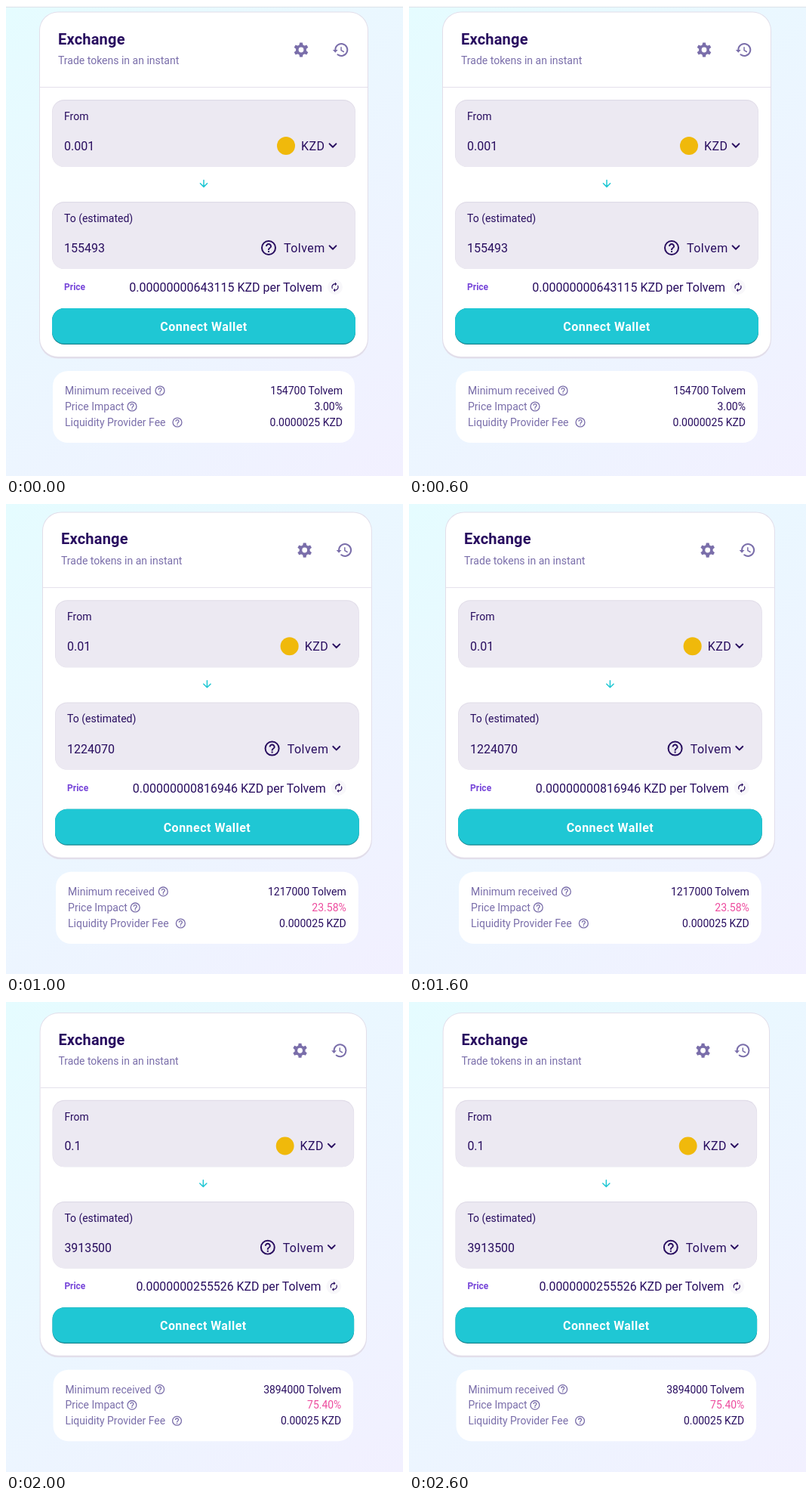
An HTML page for the animation above (3000 ms loop, 526 by 622 pixels).

```html
<!DOCTYPE html>
<html lang="en">
<head>
<meta charset="utf-8">
<title>Token exchange</title>
<style>
  html, body { margin: 0; width: 100%; height: 100%; overflow: hidden; }
  body { background: linear-gradient(139.73deg, #e5fcff 0%, #f2f0ff 100%); }
  svg { display: block; width: 526px; height: 622px; }
  text { font: 400 14px Roboto, Arial, sans-serif; fill: #280d5f; }
  .title { font-size: 20px; font-weight: 700; letter-spacing: .01em; }
  .soft { fill: #7a6eaa; }
  .big { font-size: 16px; }
  .token { font-size: 16px; letter-spacing: .03em; }
  .label { font-size: 12px; font-weight: 700; fill: #7645d9; }
  .button { font-size: 16px; font-weight: 700; letter-spacing: .03em; fill: #fff; text-anchor: middle; }
  .end { text-anchor: end; }
  .ink { color: #280d5f; }
  .muted { color: #7a6eaa; }
  .line { fill: none; stroke: #280d5f; stroke-width: 2; stroke-linecap: round; stroke-linejoin: round; }
  .arrow { stroke: #1fc7d4; stroke-width: 1.5; }
</style>
</head>
<body>
<svg viewBox="0 0 526 622">
  <defs>
    <g id="help">
      <circle r="9" fill="none" stroke="currentColor" stroke-width="2"/>
      <path transform="translate(-12 -12)" fill="currentColor" d="M11 16h2v2h-2zM12 6c-2.21 0-4 1.79-4 4h2c0-1.1.9-2 2-2s2 .9 2 2c0 2-3 1.75-3 5h2c0-2.25 3-2.5 3-5 0-2.21-1.79-4-4-4z"/>
    </g>
    <path id="teeth" d="M-2.6-5.5L-1.9-9.6H1.9L2.6-5.5V5.5L1.9 9.6H-1.9L-2.6 5.5z"/>
    <path id="chevron" class="line" d="M-4.4-2.6L0 1.8L4.4-2.6"/>
    <g id="field">
      <rect x="61" width="402" height="89" rx="16" fill="#e0dce8"/>
      <rect x="61.5" y="1.2" width="401" height="87.8" rx="15.5" fill="#ece9f2"/>
    </g>
  </defs>

  <g id="edge">
    <rect width="526" height="1" fill="#fbfdfe"/>
    <rect y="1" width="526" height="1" fill="#dde3ea"/>
  </g>

  <g id="panel">
    <rect x="44" y="7.5" width="436" height="459" rx="25" fill="#e2deea"/>
    <rect x="45" y="8.5" width="434" height="455.5" rx="24" fill="#fff"/>
    <rect x="45" y="107" width="434" height="1" fill="#e4e0eb"/>

    <text x="69" y="50.5" class="title">Exchange</text>
    <text x="69" y="77" class="soft">Trade tokens in an instant</text>

    <g transform="translate(391 58)" fill="#7a6eaa">
      <use href="#teeth"/>
      <use href="#teeth" transform="rotate(60)"/>
      <use href="#teeth" transform="rotate(120)"/>
      <circle r="7"/>
      <circle r="3.4" fill="#fff"/>
    </g>
    <g transform="translate(431.3 46)">
      <path class="line" style="stroke:#7a6eaa" stroke-linecap="round" d="M5 12A8 8 0 1 1 8.1 18.3"/>
      <path fill="#7a6eaa" d="M1.6 12H8.4L5 15.8z"/>
      <path class="line" style="stroke:#7a6eaa;stroke-width:1.5" d="M12.75 8.75V12.6L16 14.5"/>
    </g>

    <use href="#field" y="124"/>
    <text x="77" y="151">From</text>
    <text x="77" y="191" class="big" id="pay"></text>
    <circle cx="371" cy="185" r="12" fill="#f0b90b"/>
    <text x="391" y="191" class="token">KZD</text>
    <use href="#chevron" x="433" y="185"/>

    <path class="line arrow" d="M262 230.5V239M257.4 234.8L262 239.4L266.6 234.8"/>

    <use href="#field" y="259"/>
    <text x="77" y="286">To (estimated)</text>
    <text x="77" y="326" class="big" id="get"></text>
    <use href="#help" x="348" y="320" class="ink"/>
    <text x="368" y="326" class="token">Tolvem</text>
    <use href="#chevron" x="433" y="320"/>

    <text x="77" y="376" class="label">Price</text>
    <text x="419" y="378" class="big end" id="price"></text>
    <circle cx="436" cy="372" r="10" fill="#f8f7fa"/>
    <path transform="translate(436 372) scale(.58) translate(-12 -12)" fill="#280d5f" d="M12 6v3l4-4-4-4v3c-4.42 0-8 3.58-8 8 0 1.57.46 3.03 1.24 4.26L6.7 14.8c-.45-.83-.7-1.79-.7-2.8 0-3.31 2.69-6 6-6zm6.76 1.74L17.3 9.2c.44.84.7 1.79.7 2.8 0 3.31-2.69 6-6 6v-3l-4 4 4 4v-3c4.42 0 8-3.58 8-8 0-1.57-.46-3.03-1.24-4.26z"/>

    <rect x="61" y="400" width="402" height="48" rx="16" fill="#18858f"/>
    <rect x="61" y="400" width="402" height="46.8" rx="16" fill="#1fc7d4"/>
    <text x="262" y="430" class="button">Connect Wallet</text>

    <rect x="62" y="483" width="400" height="95" rx="20" fill="#fff"/>
    <text x="78" y="514" class="soft">Minimum received</text>
    <text x="78" y="535" class="soft">Price Impact</text>
    <text x="78" y="556" class="soft">Liquidity Provider Fee</text>
    <g class="muted">
      <use href="#help" transform="translate(204 509) scale(.66)"/>
      <use href="#help" transform="translate(167 530) scale(.66)"/>
      <use href="#help" transform="translate(227 551) scale(.66)"/>
    </g>
    <text x="446" y="514" class="end" id="min"></text>
    <text x="446" y="535" class="end" id="impact"></text>
    <text x="446" y="556" class="end" id="fee"></text>
  </g>
</svg>
<script>
  const STEP = 1000;
  const quotes = [
    { x: 0, y: 0, scale: 1, pay: '0.001', get: '155493', price: '0.00000000643115',
      min: '154700', impact: '3.00%', fee: '0.0000025', tint: '#280d5f' },
    { x: 3.9, y: 2.9, scale: 1.002, pay: '0.01', get: '1224070', price: '0.00000000816946',
      min: '1217000', impact: '23.58%', fee: '0.000025', tint: '#ed4b9e' },
    { x: .9, y: 6.6, scale: .994, pay: '0.1', get: '3913500', price: '0.0000000255526',
      min: '3894000', impact: '75.40%', fee: '0.00025', tint: '#ed4b9e' }
  ];
  const el = id => document.getElementById(id);
  const put = (id, text) => { el(id).textContent = text; };
  let shown = -1;

  function show(i) {
    const q = quotes[i];
    el('panel').setAttribute('transform', `translate(${q.x} ${q.y}) scale(${q.scale})`);
    el('edge').style.display = i ? 'none' : '';
    put('pay', q.pay);
    put('get', q.get);
    put('price', `${q.price} KZD per Tolvem`);
    put('min', `${q.min} Tolvem`);
    put('impact', q.impact);
    put('fee', `${q.fee} KZD`);
    el('impact').style.fill = q.tint;
    shown = i;
  }

  const start = performance.now();
  function tick() {
    const i = Math.floor((performance.now() - start) / STEP) % quotes.length;
    if (i !== shown) show(i);
    requestAnimationFrame(tick);
  }
  tick();
</script>
</body>
</html>
```
